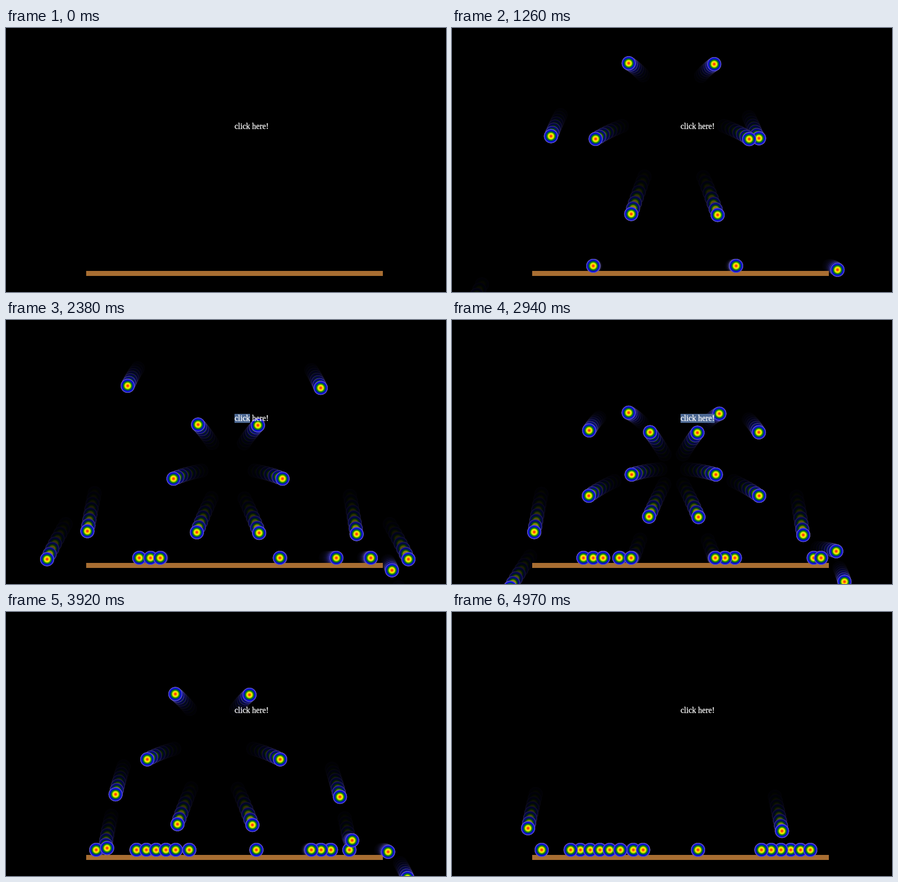
Write an HTML page with a canvas that moves like this. It is 878 px wide and 526 px high and loops after 5040 ms.

```html
<!DOCTYPE html>
<html lang="en">
<head>
<meta charset="utf-8">
<title>Bursts</title>
<style>
  html, body { margin: 0; height: 100%; overflow: hidden; background: #000; }
  canvas { display: block; }
</style>
</head>
<body>
<canvas id="stage" width="878" height="526"></canvas>
<script>
const ctx = document.getElementById('stage').getContext('2d');
const LOOP = 5040, FRAME = 70, STEPS_PER_MS = 0.06, STEPS = 304;
const BAR = { left: 160, right: 752, top: 484, bottom: 494 };
const RADIUS = 10, CONTACT = 19.5, DRAG = 0.99, GRAVITY = 0.255;
const ROLL_FRICTION = 0.018, REST_SPEED = 0.2, REST_WEIGHT = 0.12;
const TRAIL = 7, FADE = 0.4;

// One click each: step, x, y, sideways skew
const bursts = [
  [17.2, 411.5, 229, 1], [56.2, 441, 178, 1], [89.5, 442.5, 175, 1],
  [129.5, 443, 296, 0], [154.7, 443, 296.5, 0], [166.3, 442.5, 296.5, 0],
  [218.7, 414.5, 262.5, 1]
];

const clamp = (v, lo, hi) => Math.max(lo, Math.min(hi, v));

function spawn([time, x, y, skew], id, step) {
  const late = step - time, balls = [];
  for (const side of [-1, 1]) {
    const sink = side > 0 ? 0.1 : 0;
    for (const [row, vx, vy] of [
      [-1, side * (4.35 + 0.15 * skew) - 0.17 * skew, -8.17 + sink],
      [0, side * 8.65, 0],
      [1, side * 4.55 + 0.16 * skew, 8.1 + sink]
    ]) {
      const gap = row ? 5 : 0;
      balls.push({
        id, start: step, path: [], vx, vy: vy + GRAVITY * late,
        x: x + side * gap + vx * late, y: y + row * gap + vy * late
      });
    }
  }
  return balls;
}

// Balls at rest on the bar hardly give way
function collide(a, b) {
  let nx = b.x - a.x, ny = b.y - a.y;
  const dist = Math.hypot(nx, ny);
  if (a.id === b.id || dist >= CONTACT || dist === 0) return;
  nx /= dist; ny /= dist;
  const wa = a.resting ? REST_WEIGHT : 1, wb = b.resting ? REST_WEIGHT : 1;
  const shareA = wa / (wa + wb), shareB = 1 - shareA;
  const push = CONTACT - dist;
  a.x -= nx * push * shareA; a.y -= ny * push * shareA;
  b.x += nx * push * shareB; b.y += ny * push * shareB;
  const hit = (b.vx - a.vx) * nx + (b.vy - a.vy) * ny;
  if (hit < 0) {
    a.vx += hit * nx * shareA; a.vy += hit * ny * shareA;
    b.vx -= hit * nx * shareB; b.vy -= hit * ny * shareB;
  }
}

function touchBar(b) {
  if (b.y > BAR.bottom + RADIUS) return;
  const px = clamp(b.x, BAR.left, BAR.right), dx = b.x - px;
  const py = dx ? clamp(b.y, BAR.top, BAR.bottom) : BAR.top;
  const dy = dx ? b.y - py : Math.min(b.y - py, -0.001);
  const dist = Math.hypot(dx, dy);
  if (dist >= RADIUS) return;
  const nx = dx / dist, ny = dy / dist;
  b.x = px + nx * RADIUS;
  b.y = py + ny * RADIUS;
  const vn = b.vx * nx + b.vy * ny;
  if (vn < 0) { b.vx -= vn * nx; b.vy -= vn * ny; }
  if (!dx) {
    if (vn < -2) b.vx *= b.vx > 0 ? 0.46 : vn < -13 ? 0.85 : 0.3;
    b.rolling = true;
  }
}

function simulate() {
  const balls = [];
  for (let step = 0; step < STEPS; step++) {
    for (const b of balls) {
      b.x += b.vx; b.y += b.vy;
      if (!b.rolling) b.vx *= DRAG;
      b.vy = b.vy * DRAG + GRAVITY;
      b.rolling = false;
    }
    for (let pass = 0; pass < 3; pass++) {
      balls.forEach((a, i) => {
        for (let j = i + 1; j < balls.length; j++) collide(a, balls[j]);
      });
      balls.forEach(touchBar);
    }
    for (const b of balls) {
      if (b.rolling) b.vx -= clamp(b.vx, -ROLL_FRICTION, ROLL_FRICTION);
      b.resting = b.rolling && Math.abs(b.vx) < REST_SPEED;
    }
    bursts.forEach((burst, id) => {
      if (Math.ceil(burst[0]) === step) balls.push(...spawn(burst, id, step));
    });
    for (const b of balls) b.path.push([b.x, b.y]);
  }
  return balls;
}

const balls = simulate();
const glow = ctx.createRadialGradient(0, 0, 0, 0, 0, 14.5);
[[0, '#ff2800'], [0.13, '#ff5010'], [0.26, '#ffd800'], [0.36, '#f0f000'],
 [0.48, '#58a800'], [0.57, '#007a10'], [0.66, '#063c70'], [0.75, '#0808d0'],
 [0.86, '#1c1cd4'], [0.93, '#6c64cc'], [0.97, '#5a52a8'], [1, 'rgba(90,82,168,0)']]
  .forEach(([at, color]) => glow.addColorStop(at, color));

function drawBall(ball, step) {
  const q = step - ball.start;
  if (q < 0) return;
  const i = Math.floor(q), f = q - i;
  const [x0, y0] = ball.path[i], [x1, y1] = ball.path[i + 1];
  ctx.save();
  ctx.translate(x0 + (x1 - x0) * f, y0 + (y1 - y0) * f);
  ctx.fillStyle = glow;
  ctx.beginPath();
  ctx.arc(0, 0, 14.5, 0, 7);
  ctx.fill();
  ctx.restore();
}

function fill(color, x, y, w, h) {
  ctx.fillStyle = color;
  ctx.fillRect(x, y, w, h);
}

function draw(ms) {
  const now = ms * STEPS_PER_MS;
  fill('#000', 0, 0, 878, 526);
  for (let age = TRAIL; age >= 0; age--) {
    fill(`rgba(0,0,0,${FADE})`, 0, 0, 878, 526);
    fill('#a86e32', BAR.left, BAR.top, BAR.right - BAR.left, BAR.bottom - BAR.top);
    for (const b of balls) drawBall(b, now - age);
  }
  const selected = ms < 2170 || ms >= 3640 ? 0 : ms < 2590 ? 31 : 68;
  fill('rgba(84,114,160,0.92)', 456, 187, selected, 18);
  ctx.fillStyle = ctx.strokeStyle = '#fff';
  ctx.lineWidth = 0.3;
  ctx.font = '16px "Liberation Serif", Times, serif';
  ctx.fillText('click here!', 456, 201);
  ctx.strokeText('click here!', 456, 201);
}

const begin = performance.now();
function tick() {
  const ms = (performance.now() - begin) % LOOP;
  draw(Math.floor(ms / FRAME) * FRAME);
  requestAnimationFrame(tick);
}
tick();
</script>
</body>
</html>
```
